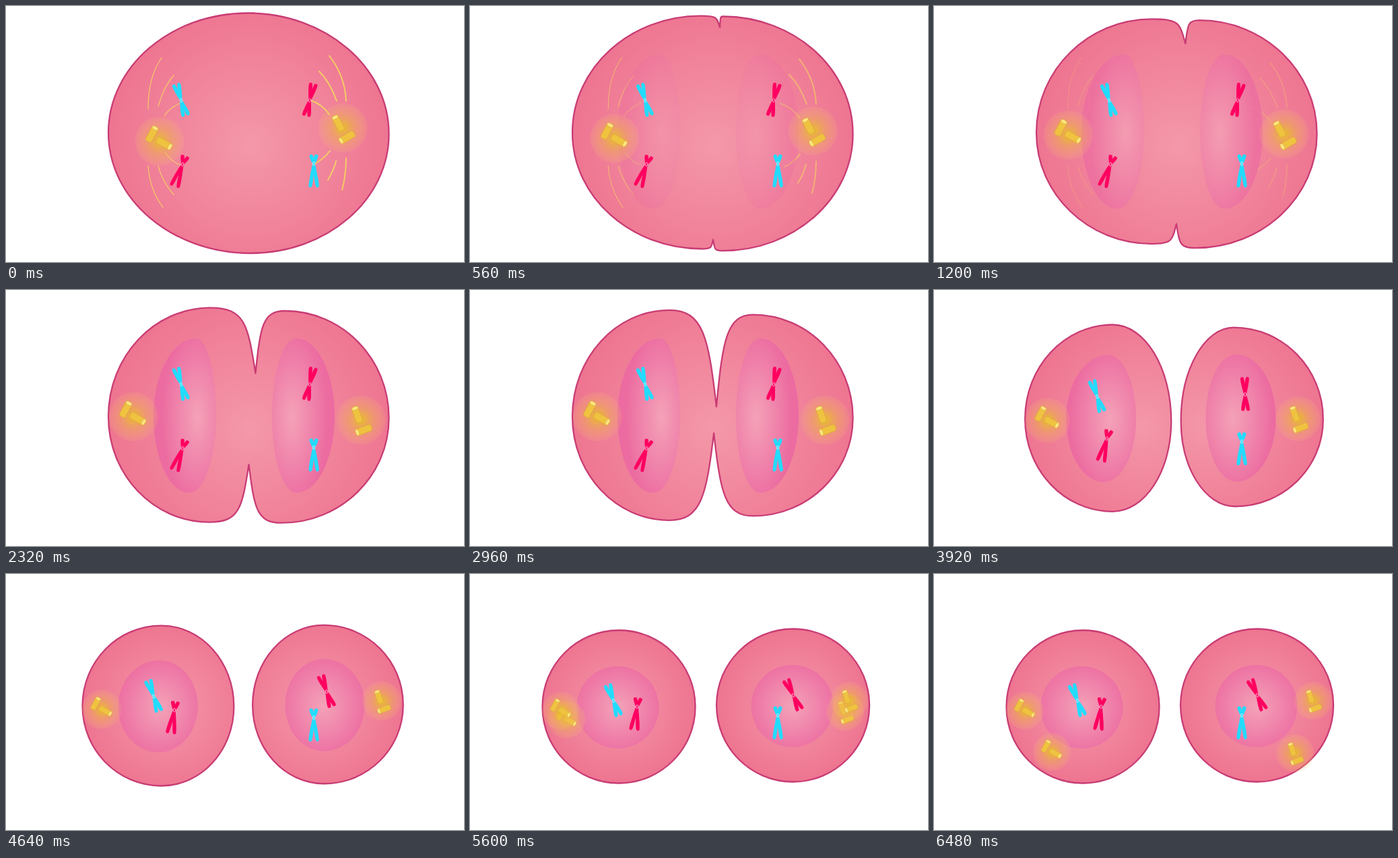
An HTML page that plays this animation: 680x380 px, repeating every 6560 ms.

```html
<!DOCTYPE html>
<html lang="en">
<head>
<meta charset="utf-8">
<title>Cell division</title>
<style>
  html, body { margin: 0; height: 100%; overflow: hidden; background: #fff; }
  svg { display: block; width: 100%; height: 100%; }
</style>
</head>
<body>
<svg id="stage" viewBox="0 0 680 380">
  <defs>
    <radialGradient id="glow">
      <stop offset="0" stop-color="#e6c41a" stop-opacity=".9"/>
      <stop offset=".5" stop-color="#eeb44a" stop-opacity=".48"/>
      <stop offset="1" stop-color="#f6c070" stop-opacity=".13"/>
    </radialGradient>
    <g id="rod" stroke="#dca83a" stroke-width=".7">
      <path d="M-5 0V-20H5V0A5 2.5 0 0 1-5 0" fill="#efc340"/>
      <ellipse cy="-20" rx="5" ry="2.7" fill="#fbe67e"/>
    </g>
    <path id="arm" d="M-1.8 0C-2.4-8-3.6-22-2.2-24.5Q0-26 2-24.5C3.4-21 2.4-8 1.8 0Z"/>
  </defs>
</svg>
<script>
const stage = document.getElementById('stage');
const LOOP = 6560, STEP = 80;
const PINCHED = 1680, PARTED = 3360, ROUND = 4840;
const KAPPA = 0.5523;

function set(el, attrs) {
  for (const name in attrs) el.setAttribute(name, attrs[name]);
  return el;
}
function add(parent, tag, attrs = {}) {
  const el = document.createElementNS('http://www.w3.org/2000/svg', tag);
  parent.append(el);
  return set(el, attrs);
}
function gradient(id, inner, outer, attrs) {
  const g = add(stage.querySelector('defs'), 'radialGradient', { id, ...attrs });
  add(g, 'stop', { offset: 0, 'stop-color': inner });
  add(g, 'stop', { offset: 1, 'stop-color': outer });
  return g;
}

const ramp = (t, from, to) => Math.min(1, Math.max(0, (t - from) / (to - from)));
// Blends numbers or equally nested lists of numbers.
const mix = (a, b, p) => Array.isArray(a) ? a.map((v, i) => mix(v, b[i], p)) : a + (b - a) * p;
function keyed(t, times, values) {
  let i = 0;
  while (i < times.length - 2 && t > times[i + 1]) i++;
  return mix(values[i], values[i + 1], ramp(t, times[i], times[i + 1]));
}

// Quarter arcs: level at the cap (top or bottom), upright or leaning at the side.
function handles([cx, cy], [sx, sy], k, lean) {
  return [[cx + (sx - cx) * k, cy], [sx - (sx - cx) * lean, sy + (cy - sy) * k]];
}
function toSide(cap, side, k, lean) {
  const [a, b] = handles(cap, side, k, lean);
  return `C${a} ${b} ${side}`;
}
function toCap(side, cap, k, lean) {
  const [a, b] = handles(cap, side, k, lean);
  return `C${b} ${a} ${cap}`;
}
// Outline from one inner point over cap, outer side and cap to the other inner point.
function outline([start, cap, outer, cap2, end], k = KAPPA, lean = 0) {
  return toCap(start, cap, k, lean) + toSide(cap, outer, KAPPA, 0) +
    toCap(outer, cap2, KAPPA, 0) + toSide(cap2, end, k, lean);
}
function circle([cx, cy], r, dir) {
  const inner = [cx + dir * r, cy];
  return [inner, [cx, cy - r], [cx - dir * r, cy], [cx, cy + r], inner];
}
function cellPoses(outer, pinchedCaps, partedCaps, partedX, end) {
  return [
    [[369, 10.5], [359, 10.5], outer, [363, 367], [362, 367]],
    [[375, 74], pinchedCaps[0], outer, pinchedCaps[1], [359, 306]],
    [[partedX, 204], partedCaps[0], outer, partedCaps[1], [partedX, 183]],
    end
  ];
}

const sides = [
  {
    name: 'left', center: [221, 197], light: 0.7,
    cellPoses: cellPoses([152, 188], [[310, 23], [308, 347.5]], [[292, 32], [292, 340]], 363,
      circle([221, 197], 113.5, 1)),
    nucleusPoses: [[[312, 187], [282, 72], [219, 187], [272, 301], [312, 187]],
      circle([219.5, 198], 61, 1)],
    fibers: 'M231 77Q211 105 211 153M249 103Q235 118 226 149M235 163Q243 151 261 143' +
      'M211 237Q213 272 233 299M226 238Q233 262 249 280M236 217Q245 231 259 236',
    fiberWidth: 1.2, drift: [-17, 0],
    rods: [[-16, -2, 28], [-2, -2, 120]], tilt: 0,
    path: [[228, 201], [189, 188], [189, 188], [135, 203]], twin: [175, 264]
  },
  {
    name: 'right', center: [479.5, 195], light: 0.32,
    cellPoses: cellPoses([568.5, 190], [[408, 25.5], [398, 356]], [[424, 40], [427, 329]], 367,
      circle([479.5, 195], 113.5, -1)),
    nucleusPoses: [[[395, 187], [431, 72], [488, 187], [431, 301], [395, 187]],
      circle([478.5, 196], 61, -1)],
    fibers: 'M480 74Q503 103 505 141M465 97Q481 113 491 141M480 161Q470 146 452 140' +
      'M505 226Q505 250 499 273M490 230Q487 243 478 258M481 215Q471 228 458 234',
    fiberWidth: 2, drift: [26, 14],
    rods: [[-2, 2, -28], [15, 9, -120]], tilt: 9,
    path: [[500, 181], [527, 193], [527, 193], [563, 188]], twin: [536, 266]
  }
];

const BLUE = '#22dcff', RED = '#ff0060';
// Arm pairs as half the spread in degrees and the length.
const EVEN = { up: [9.5, 26], down: [10, 24.5] };
const UNEVEN = { up: [19, 14], down: [9, 35.5] };
// Poses are x, y and angle.
const chromosomes = [
  { shape: EVEN, color: BLUE, from: [260, 140, -17], to: [213, 188, -20] },
  { shape: UNEVEN, color: RED, from: [262, 235, 20], to: [248, 197, 7] },
  { shape: EVEN, color: RED, from: [451, 140, 13], to: [480, 180, -25] },
  { shape: UNEVEN, color: BLUE, from: [457, 234, 0], to: [457, 210, 0] }
];

function chromosome({ shape: { up, down }, color }) {
  const g = add(stage, 'g', { fill: color });
  for (const dir of [-1, 1])
    for (const [angle, length] of [[dir * up[0], up[1]], [180 + dir * down[0], down[1]]])
      add(g, 'use', { href: '#arm', transform: `rotate(${angle}) scale(1 ${length / 25})` });
  add(g, 'ellipse', { rx: 1.6, ry: 2.7, stroke: '#fff', 'stroke-width': 0.8, 'stroke-opacity': 0.8 });
  return g;
}
function centrosome(side) {
  const g = add(stage, 'g');
  add(g, 'circle', { r: 36.5, fill: 'url(#glow)' });
  for (const [x, y, a] of side.rods)
    add(g, 'use', { href: '#rod', transform: `translate(${x} ${y}) rotate(${a})` });
  return g;
}

for (const s of sides) {
  s.shade = gradient(s.name + 'Cell', '#f498a9', '#ee7490', { gradientUnits: 'userSpaceOnUse' });
  s.nucleusShade = gradient(s.name + 'Nucleus', '#f4a2b8', '#ec6ba0', { cy: 0.51, r: 0.58 });
  s.cell = add(stage, 'path', {
    fill: `url(#${s.name}Cell)`, stroke: '#c83c74', 'stroke-width': 2.3, 'stroke-linejoin': 'round'
  });
}
for (const s of sides) {
  s.fiberLines = add(stage, 'path', {
    d: s.fibers, fill: 'none', stroke: '#f5cc66', 'stroke-width': s.fiberWidth, 'stroke-linecap': 'round'
  });
  s.nucleus = add(stage, 'path', { fill: `url(#${s.name}Nucleus)` });
}
for (const s of sides) {
  s.twinMark = centrosome(s);
  s.mark = centrosome(s);
}
for (const c of chromosomes) c.el = chromosome(c);

function drawCells(t, p) {
  const [left, right] = sides.map(s => keyed(t, [0, PINCHED, PARTED, ROUND], s.cellPoses));
  const swell = keyed(t, [0, 2960, 3680], [0.9, 0.72, KAPPA]);
  const lean = 0.17 * (1 - ramp(t, 2960, 3680));
  const paths = [left, right];
  if (left[0][1] < left[4][1]) {
    right[0] = left[0];
    right[4] = left[4];
    paths[0] = `M${left[0]}${outline(left, swell, lean)}${outline(right.reverse(), swell, lean)}Z`;
    paths[1] = '';
  } else {
    [left, right].forEach((half, i) => {
      half[0] = half[4] = mix(half[0], half[4], 0.5);
      paths[i] = `M${half[0]}${outline(half, swell, lean)}Z`;
    });
  }
  sides.forEach((s, i) => {
    set(s.cell, { d: paths[i] });
    const [cx, cy, r] = mix([363, 206, 215], [...s.center, 115], p);
    set(s.shade, { cx, cy, r });
  });
}

function draw(t) {
  const settle = ramp(t, 0, 1640), p = ramp(t, PARTED, ROUND), twin = ramp(t, 5360, 6480);
  drawCells(t, p);
  for (const s of sides) {
    set(s.fiberLines, { opacity: 1 - settle, transform: `translate(${mix([0, 0], s.drift, settle)})` });
    const core = mix(...s.nucleusPoses, p);
    set(s.nucleus, { d: `M${core[0]}${outline(core)}Z`, opacity: settle });
    set(s.nucleusShade, { cx: mix(s.light, 0.5, p) });

    const spot = keyed(t, [0, 1640, PARTED, ROUND], s.path);
    const pose = ` rotate(${s.tilt * ramp(t, 1200, 1640)}) scale(${1 - 0.23 * p})`;
    set(s.mark, { transform: `translate(${spot})` + pose });
    set(s.twinMark, { transform: `translate(${mix(spot, s.twin, twin)})` + pose, opacity: twin ? 1 : 0 });
  }
  for (const c of chromosomes) {
    const [x, y, a] = mix(c.from, c.to, p);
    set(c.el, { transform: `translate(${x} ${y}) rotate(${a})` });
  }
}

const start = performance.now();
function tick() {
  const t = (performance.now() - start) % LOOP;
  draw(Math.floor(t / STEP) * STEP);
  requestAnimationFrame(tick);
}
tick();
</script>
</body>
</html>
```
